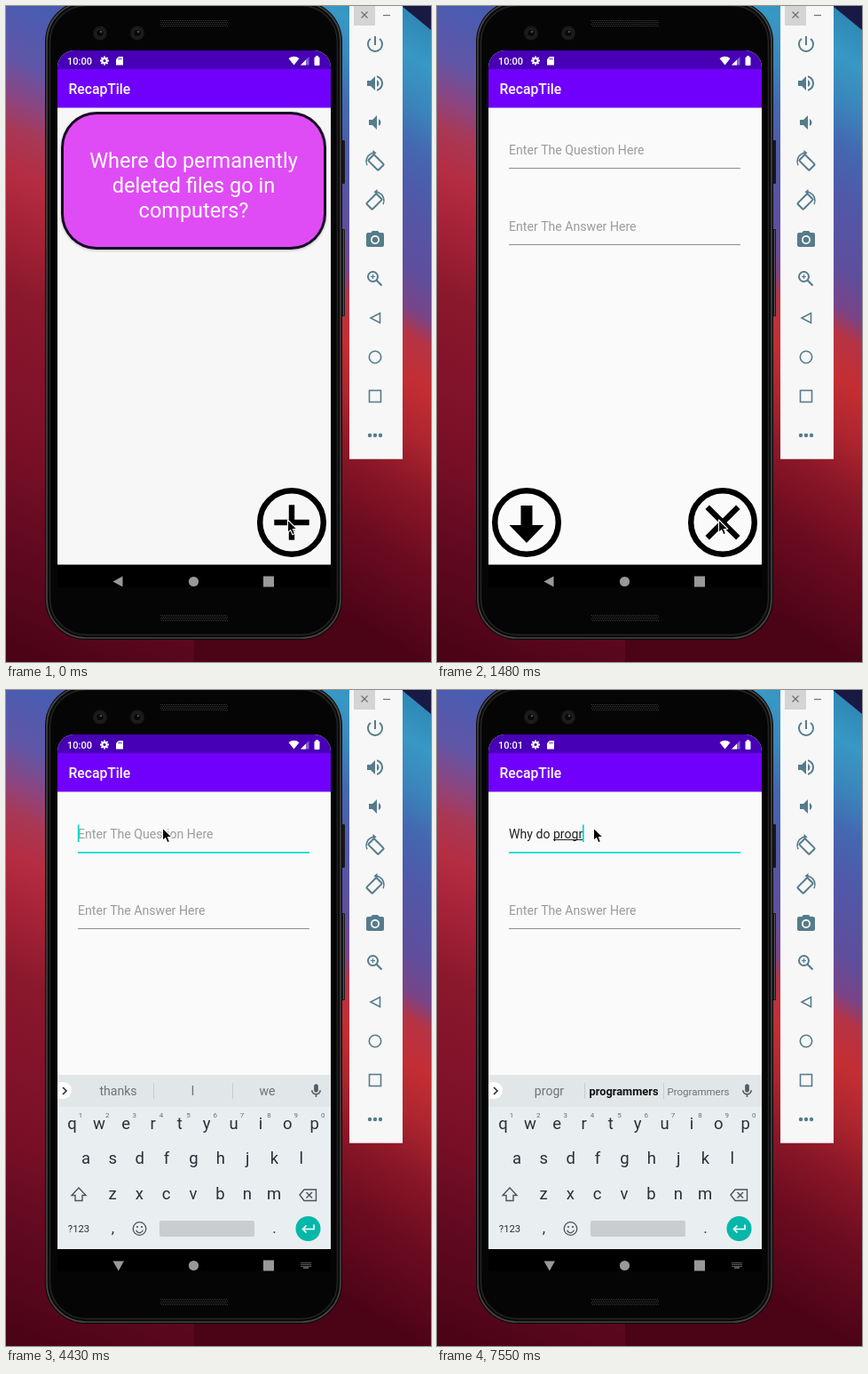
Animation of 479 by 738 pixels, one loop 7.99 s. Source, as an HTML page with a canvas:

```html
<!DOCTYPE html>
<html lang="en">
<head>
<meta charset="utf-8">
<title>Card app</title>
<style>
html, body { margin: 0; width: 100%; height: 100%; overflow: hidden; background: #4b0316; }
canvas { display: block; }
</style>
</head>
<body>
<canvas id="stage" width="479" height="738"></canvas>
<script>
const ctx = document.getElementById('stage').getContext('2d');
const LOOP = 7990;
const TITLE = 'RecapTile';
const TEAL = '#00d8cc', TOOL = '#557c8b', KEY = '#263238';

const icons = {
  power: 'M13 3h-2v10h2V3zm4.83 2.17l-1.42 1.42A6.92 6.92 0 0 1 19 12c0 3.87-3.13 7-7 7A6.995 6.995 0 0 1 7.58 6.58L6.17 5.17A8.932 8.932 0 0 0 3 12a9 9 0 0 0 18 0c0-2.74-1.23-5.18-3.17-6.83z',
  loud: 'M3 9v6h4l5 5V4L7 9H3zm13.5 3A4.5 4.5 0 0 0 14 7.97v8.05c1.48-.73 2.5-2.25 2.5-4.02zM14 3.23v2.06c2.89.86 5 3.54 5 6.71s-2.11 5.85-5 6.71v2.06c4.01-.91 7-4.49 7-8.77s-2.99-7.86-7-8.77z',
  quiet: 'M18.5 12A4.5 4.5 0 0 0 16 7.97v8.05c1.48-.73 2.5-2.25 2.5-4.02zM5 9v6h4l5 5V4L9 9H5z',
  camera: 'M9 2L7.17 4H4c-1.1 0-2 .9-2 2v12c0 1.1.9 2 2 2h16c1.1 0 2-.9 2-2V6c0-1.1-.9-2-2-2h-3.17L15 2H9zm3 15c-2.76 0-5-2.24-5-5s2.24-5 5-5 5 2.24 5 5-2.24 5-5 5z',
  mic: 'M12 14c1.66 0 3-1.34 3-3V5c0-1.66-1.34-3-3-3S9 3.34 9 5v6c0 1.66 1.34 3 3 3zm5-3c0 2.76-2.24 5-5 5s-5-2.24-5-5H5c0 3.53 2.61 6.43 6 6.92V21h2v-3.08c3.39-.49 6-3.39 6-6.92h-2z'
};

// [start, committed text, word in progress, suggestions, caret shown]
const first = ['thanks', 'I', 'we'];
const next = ['is', 'do', 'are'];
const typing = [
  [0, '', '', first, true],
  [2940, '', '', first, false],
  [3390, '', '', first, true],
  [3990, '', '', first, false],
  [4430, '', '', first, true],
  [4880, '', '', first, false],
  [5030, '', 'W', ['W', 'We', 'Why'], true],
  [5180, '', 'Wh', ['Wh', 'Why', 'When'], true],
  [5330, '', 'Why', ['Why', 'Who', 'When'], true],
  [5480, 'Why ', '', next, true],
  [5930, 'Why ', '', next, false],
  [6070, 'Why ', 'd', ['d', 'do', 'did'], true],
  [6220, 'Why ', 'do', ['do', "don't", 'does'], true],
  [6370, 'Why do ', '', ['you', 'I', 'people'], true],
  [6660, 'Why do ', 'p', ['p', 'people', 'programs'], true],
  [6800, 'Why do ', 'pr', ['pr', 'programs', 'programmers'], true],
  [6950, 'Why do ', 'pro', ['pro', 'programs', 'programmers'], true],
  [7400, 'Why do ', 'prog', ['prog', 'programmers', 'Programmers'], true],
  [7550, 'Why do ', 'progr', ['progr', 'programmers', 'Programmers'], true]
];

// [start, offset of the new page, top of its visible part, shift and dimming of the old page]
const slides = [[1040, 23, 427, -1, .06], [1190, 7, 94, -8.5, .12], [1330, 2, 52, -11, .12], [1480, 0]];
const pointerTimes = [1630, 1770, 1920, 2060, 2210];
const at = (steps, t) => steps.filter(s => s[0] <= t).pop();

function rect(x, y, w, h, color) {
  ctx.fillStyle = color;
  ctx.fillRect(x, y, w, h);
}
function round(x, y, w, h, r, fill, stroke, width = 1) {
  ctx.beginPath();
  ctx.roundRect(x, y, w, h, r);
  paint(fill, stroke, width);
}
function paint(fill, stroke, width = 1) {
  if (fill) { ctx.fillStyle = fill; ctx.fill(); }
  if (stroke) { ctx.strokeStyle = stroke; ctx.lineWidth = width; ctx.stroke(); }
}
function circle(x, y, r, fill, stroke, width) {
  arc(x, y, r, 0, 7, fill, stroke, width);
}
function arc(x, y, r, from, to, fill, stroke, width) {
  ctx.beginPath();
  ctx.arc(x, y, r, from, to);
  paint(fill, stroke, width);
}
function shape(points, fill, stroke, width, open) {
  ctx.beginPath();
  points.forEach(([x, y]) => ctx.lineTo(x, y));
  if (!open) ctx.closePath();
  paint(fill, stroke, width);
}
const line = (points, color, width) => shape(points, null, color, width, true);
function text(str, x, y, size, color, weight = 400, align = 'left') {
  ctx.font = `${weight} ${size}px Roboto, sans-serif`;
  ctx.textAlign = align;
  ctx.fillStyle = color;
  ctx.fillText(str, x, y);
  return ctx.measureText(str).width;
}
function icon(name, x, y, color, scale = 1) {
  ctx.save();
  ctx.translate(x, y);
  ctx.scale(scale, scale);
  ctx.translate(-12, -12);
  ctx.fillStyle = color;
  ctx.fill(new Path2D(icons[name]), 'evenodd');
  ctx.restore();
}

// Sloping color bands; the stops are heights at the horizontal position "pivot".
function bands(x, w, pivot, slope, stops) {
  const g = ctx.createLinearGradient(0, 0, 0, 738);
  stops.forEach(([y, c]) => g.addColorStop(y / 738, c));
  ctx.save();
  ctx.transform(1, slope, 0, 1, 0, -slope * pivot);
  rect(x, -250, w, 1250, g);
  ctx.restore();
}

function backdrop() {
  bands(0, 212, 22, .45, [
    [0, '#4a5cb0'], [65, '#6156a7'], [108, '#8a4682'], [145, '#a83856'], [195, '#b52c41'],
    [255, '#a42236'], [330, '#8a182d'], [420, '#82132a'], [510, '#780f26'], [610, '#600920'], [738, '#4b0316']]);
  bands(212, 267, 463, .6, [
    [0, '#2c84b2'], [60, '#3898c4'], [110, '#3a86bc'], [160, '#4468b0'], [220, '#5058a8'], [300, '#5f4e9c'],
    [345, '#794488'], [374, '#b53445'], [425, '#c42e33'], [485, '#ad252e'], [545, '#8b1727'], [620, '#6e0c21'], [738, '#4b0316']]);
  shape([[446, 0], [479, 0], [479, 27]], '#191a44');
}

function grille(y) {
  for (let row = 0; row < 4; row++)
    for (let x = 174 + row % 2; x < 250; x += 2) rect(x, y + row * 2, 1, 1, '#3d3d3d');
}

function phone() {
  round(377, 151, 5, 49, 1, '#17171b');
  round(377, 251, 5, 98, 1, '#17171b');
  rect(380, 252, 1, 96, '#55505a');
  round(44, -6, 335, 719, 46, '#0a0a0a');
  round(46, -4, 331, 715, 44, null, '#454545', 1.6);
  round(49.5, -.5, 324, 708, 41, '#050505', '#242424', 1.5);
  grille(16);
  grille(685);
  [106, 148].forEach(x => {
    circle(x, 30.5, 8, '#191919');
    circle(x, 30.5, 4.5, '#090909', '#2b2b2b');
    circle(x + 1, 29, 1.3, '#4a4a4a');
  });
}

function rotateIcon(y, flip) {
  ctx.save();
  ctx.translate(416, y);
  ctx.scale(flip, 1);
  arc(0, 0, 10, 2.7, 4.5, null, TOOL, 1.6);
  shape([[-2.5, -13], [1.5, -9.8], [-2.5, -6.8]], TOOL);
  ctx.translate(1, 1);
  ctx.rotate(-Math.PI / 4);
  round(-4.7, -8, 9.4, 16, 1, null, TOOL, 2);
  ctx.restore();
}

function toolbar() {
  rect(387, 0, 60, 509, '#f7f7f8');
  line([[387, 509.5], [447, 509.5]], '#c9bdc3', 1);
  rect(392, 0, 24, 22, '#d4d4d5');
  line([[400.5, 6.5], [407.5, 13.5]], '#717171', 1.2);
  line([[407.5, 6.5], [400.5, 13.5]], '#717171', 1.2);
  line([[425, 10.5], [433, 10.5]], '#717171', 1.2);
  const x = 416;
  icon('power', x, 43, TOOL);
  icon('loud', x, 87, TOOL);
  icon('quiet', x, 131, TOOL);
  rotateIcon(175, 1);
  rotateIcon(219, -1);
  icon('camera', x, 263, TOOL);
  circle(x, 263, 3.2, TOOL);
  circle(413.5, 304.5, 5.5, null, TOOL, 2);
  line([[417.5, 308.5], [423.5, 314.5]], TOOL, 2.2);
  line([[411, 304.5], [416, 304.5]], TOOL, 1.2);
  line([[413.5, 302], [413.5, 307]], TOOL, 1.2);
  shape([[411, 351], [421.5, 345.5], [421.5, 356.5]], null, TOOL, 1.6);
  circle(x, 395, 6.7, null, TOOL, 1.6);
  ctx.strokeRect(409.5, 432.5, 13, 13);
  [-6, 0, 6].forEach(dx => circle(x + dx, 483, 2.2, TOOL));
}

function appBar() {
  rect(58, 50, 308, 21, '#4700b5');
  rect(58, 71, 308, 43.5, '#7000fb');
  text(TITLE, 70.5, 98.5, 15.7, '#fff', 500);
}

function ring(x) {
  circle(x, 581, 35.8, null, '#000', 6.5);
}
function cross(x, angle) {
  ctx.save();
  ctx.translate(x, 581);
  ctx.rotate(angle);
  const arm = angle ? 24.5 : 19.7;
  rect(-arm, -3.2, arm * 2, 6.4, '#000');
  rect(-3.2, -arm, 6.4, arm * 2, '#000');
  ctx.restore();
}

function cardPage() {
  rect(58, 50, 308, 578.5, '#f7f7f7');
  appBar();
  ctx.save();
  ctx.shadowColor = 'rgba(0,0,0,.25)';
  ctx.shadowBlur = 3;
  ctx.shadowOffsetY = 1;
  round(62, 119, 299, 155, 40, '#150a24');
  ctx.restore();
  round(65, 122, 293, 149, 37, '#df4cf5');
  ['Where do permanently', 'deleted files go in', 'computers?'].forEach((row, i) =>
    text(row, 211.5, 182 + i * 28, 23.5, '#fff', 400, 'center'));
  ring(322);
  cross(322, 0);
}

function formPage(t) {
  const focused = t >= 2510;
  const [, done, word, , caret] = at(typing, t);
  rect(58, 50, 308, 578.5, '#fafafa');
  appBar();
  if (done + word) {
    const start = 81 + text(done, 81, 167, 14.1, '#212121');
    const width = text(word, start, 167, 14.1, '#212121');
    if (word) rect(start, 168, width, 1, '#212121');
  } else text('Enter The Question Here', 81, 167, 14.1, '#9b9b9b');
  ctx.font = '400 14.1px Roboto, sans-serif';
  if (focused && caret) rect(80.8 + ctx.measureText(done + word).width, 151.5, 1.7, 19.5, TEAL);
  rect(81, 182, 261, focused ? 1.7 : 1, focused ? TEAL : '#8f8f8f');
  text('Enter The Answer Here', 81, 253, 14.1, '#9b9b9b');
  rect(81, 268, 261, 1, '#8f8f8f');
  ring(101);
  shape([[94.5, 562], [107.5, 562], [107.5, 584], [120.5, 584], [101, 604], [81.5, 584], [94.5, 584]], '#000');
  ring(322);
  cross(322, Math.PI / 4);
}

function suggestion(str, x, bold) {
  const weight = bold ? 700 : 400;
  ctx.font = `${weight} 14.1px Roboto, sans-serif`;
  const size = 14.1 * Math.min(1, (bold ? 78 : 70) / ctx.measureText(str).width);
  text(str, x, 456, size, bold ? '#111' : '#6c7478', weight, 'center');
}

function letters(row, x, y) {
  [...row].forEach((c, i) => text(c, x + i * 30.35, y, 18.5, KEY, 400, 'center'));
}

function keyboard(t) {
  const words = at(typing, t)[3];
  rect(58, 433, 308, 196, '#e9eef1');
  rect(58, 433, 308, 36, '#e1e6e9');
  round(58, 441, 16, 19, [0, 9.5, 9.5, 0], '#fff');
  line([[64, 447], [68, 451], [64, 455]], '#333', 1.7);
  words.forEach((w, i) => suggestion(w, 126.5 + i * 84, i === 1 && t >= 7400));
  rect(166, 442, 1, 18, '#c8cdd0');
  rect(255, 442, 1, 18, '#c8cdd0');
  icon('mic', 349.5, 451, '#535c61', .78);

  letters('qwertyuiop', 74.5, 494);
  [...'1234567890'].forEach((n, i) => text(n, 84 + i * 30.35, 481, 8, '#657076', 400, 'center'));
  letters('asdfghjkl', 90, 533);
  letters('zxcvbnm', 120, 573);
  shape([[82, 560], [90, 568.5], [86, 568.5], [86, 574.5], [78, 574.5], [78, 568.5], [74, 568.5]], null, '#4b5459', 1.4);
  shape([[331, 568], [336, 562], [349.5, 562], [349.5, 574.5], [336, 574.5]], null, '#4b5459', 1.4);
  line([[338.5, 565], [345, 571.5]], '#4b5459', 1.4);
  line([[345, 565], [338.5, 571.5]], '#4b5459', 1.4);

  text('?123', 82, 610, 11.3, KEY, 400, 'center');
  text(',', 120.5, 611, 17, KEY, 400, 'center');
  circle(150.5, 606, 7.3, null, '#4b5459', 1.3);
  circle(148, 604, 1.1, '#4b5459');
  circle(153, 604, 1.1, '#4b5459');
  arc(150.5, 606.5, 4, .3, 2.84, null, '#4b5459', 1.3);
  round(173, 597, 107, 18, 2, '#c9cdd0');
  text('.', 302.5, 611, 17, KEY, 400, 'center');
  circle(340.5, 606, 14, '#04b8a9');
  line([[347, 601.5], [347, 606.5], [335, 606.5]], '#fff', 1.7);
  line([[338.5, 602.5], [334.5, 606.5], [338.5, 610.5]], '#fff', 1.7);
}

function statusBar(t) {
  const white = '#fff';
  text(t < 5030 ? '10:00' : '10:01', 69, 65.7, 11, white, 500);
  for (let i = 0; i < 8; i++) {
    const a = i * Math.PI / 4, c = Math.cos(a), s = Math.sin(a);
    line([[111 + c * 3, 61.5 + s * 3], [111 + c * 5, 61.5 + s * 5]], white, 2);
  }
  circle(111, 61.5, 2.6, null, white, 2);
  shape([[127, 57], [132, 57], [132, 66.5], [124, 66.5], [124, 60]], white);
  rect(127, 58.5, 1, 2, '#4700b5');
  rect(129, 58.5, 1, 2, '#4700b5');
  ctx.beginPath();
  ctx.moveTo(324.5, 66.5);
  ctx.lineTo(318.5, 59);
  ctx.quadraticCurveTo(324.5, 54.5, 330.5, 59);
  paint(white);
  shape([[332, 66.5], [341.5, 66.5], [341.5, 57]], '#8465cf');
  shape([[332, 66.5], [338, 66.5], [338, 60.5]], white);
  round(347.5, 57.5, 6, 9.5, 1, white);
  rect(349, 56, 3, 2, white);
}

function navBar(t) {
  const gray = '#999';
  rect(58, 628, 308, 26, '#000');
  if (t < 2510) shape([[120.5, 647.5], [131.5, 641.5], [131.5, 653.5]], gray);
  else {
    shape([[120.5, 642.5], [133, 642.5], [126.8, 653.5]], gray);
    for (let r = 0; r < 3; r++)
      for (let c = 0; c < 6; c++) rect(332.5 + c * 2, 644 + r * 2, 1.1, 1.1, gray);
    rect(335, 649.5, 6, 1.1, gray);
  }
  circle(211.5, 647.5, 5.6, gray);
  rect(290, 641.5, 12, 12, gray);
}

function slidingPage(t, [, offset, top, shift, dim]) {
  ctx.save();
  ctx.translate(0, shift);
  cardPage();
  ctx.restore();
  rect(58, 50, 308, 578.5, `rgba(0,0,0,${dim})`);
  ctx.save();
  ctx.beginPath();
  ctx.rect(58, top, 308, 629 + offset - top);
  ctx.clip();
  ctx.translate(0, offset);
  formPage(t);
  ctx.restore();
}

function screen(t) {
  ctx.save();
  ctx.beginPath();
  ctx.roundRect(58, 50, 308, 605, [19, 19, 0, 0]);
  ctx.clip();
  navBar(t);
  const slide = at(slides, t);
  if (!slide) cardPage();
  else if (slide[1]) slidingPage(t, slide);
  else formPage(t);
  if (t >= 2650) {
    ctx.save();
    ctx.beginPath();
    ctx.rect(58, 433, 308, 196);
    ctx.clip();
    if (t < 2800) {
      ctx.globalAlpha = .7;
      ctx.translate(0, 24);
    }
    keyboard(t);
    ctx.restore();
  }
  statusBar(t);
  ctx.restore();
}

function pointer(t) {
  const p = pointerTimes.filter(s => s <= t).length / pointerTimes.length;
  const e = p * p * (3 - 2 * p);
  ctx.save();
  ctx.translate(317.5 - 141 * e, 578 - 423 * e);
  ctx.lineJoin = 'round';
  shape([[0, 0], [0, 14.5], [3.2, 11.6], [5.4, 16.8], [8, 15.6], [5.9, 10.6], [10.2, 10.2]], '#000', '#fff', 1.1);
  ctx.restore();
}

function draw() {
  const t = performance.now() % LOOP;
  backdrop();
  phone();
  toolbar();
  screen(t);
  pointer(t);
  requestAnimationFrame(draw);
}
draw();
</script>
</body>
</html>
```
